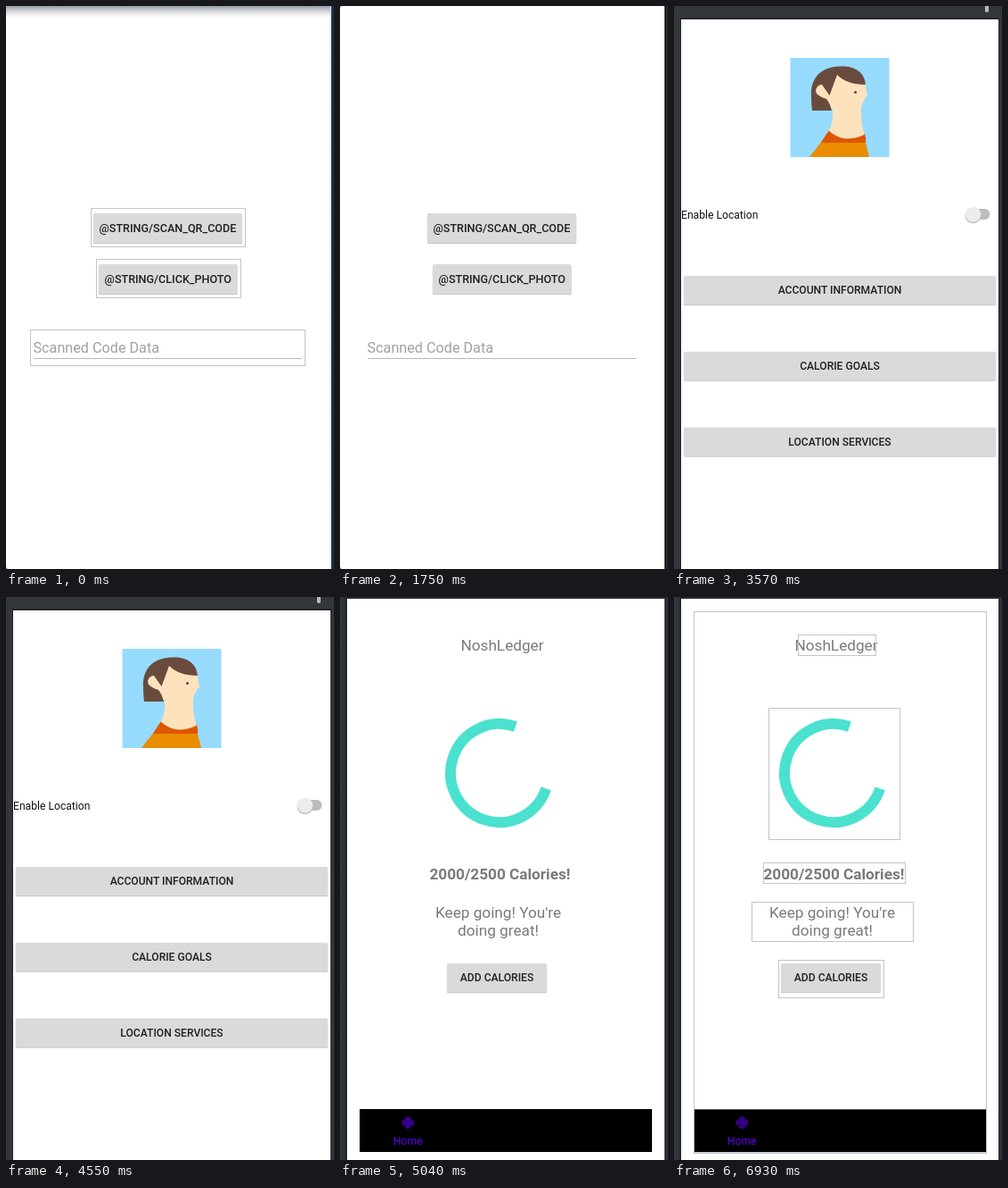
Recreate the animation shown at these times as an HTML page. Size 368 by 630 pixels, loop 7420 ms.

```html
<!DOCTYPE html>
<html lang="en">
<head>
<meta charset="utf-8">
<title>App layout preview</title>
<style>
  html, body { margin: 0; width: 100%; height: 100%; overflow: hidden; background: #fff; }
  svg { display: block; width: 368px; height: 630px; font-family: Roboto, sans-serif; }
  .btn { font-weight: 500; fill: #202020; text-anchor: middle; }
  .mid { font-size: 17.2px; fill: #7a7a7a; text-anchor: middle; }
  .box { fill: none; stroke: #c4c4c4; }
  .pick { fill: none; stroke: #8eb0d3; }
  .dots { stroke-dasharray: 1 1; }
</style>
</head>
<body>
<svg id="stage" viewBox="0 0 368 630">
  <defs>
    <linearGradient id="topShade" x1="0" y1="0" x2="0" y2="1">
      <stop offset="0" stop-color="#8b9bb2"/>
      <stop offset=".22" stop-color="#b9bbc1"/>
      <stop offset=".6" stop-color="#e6e4e4"/>
      <stop offset="1" stop-color="#fff"/>
    </linearGradient>
    <linearGradient id="side">
      <stop offset="0" stop-color="#34393e"/>
      <stop offset=".6" stop-color="#2f3337"/>
      <stop offset="1" stop-color="#202326"/>
    </linearGradient>
  </defs>

  <g id="scan">
    <rect width="368" height="630" fill="#fff"/>
    <rect x="364" width="4" height="630" fill="#24272a"/>
    <path d="M0 0h2L0 2zM0 630h2L0 628z" fill="#8a8a8a"/>
    <g id="scanButtons"></g>
    <text x="30.5" y="388" font-size="16.2" fill="#a1a1a1">Scanned Code Data</text>
    <path d="M31 394.5H332" stroke="#b9b9b9"/>
    <g id="scanBoxes">
      <rect width="365" height="13" fill="url(#topShade)"/>
      <path d="M364.5 0V630" stroke="#fff"/>
      <path d="M364.5 0V630" class="pick dots"/>
      <rect x="365" width="3" height="630" fill="#222c38"/>
    </g>
  </g>

  <g id="settings">
    <rect width="368" height="630" fill="#33373b"/>
    <rect x="7" y="13" width="358" height="617" fill="#24272a"/>
    <rect x="8" y="15" width="356" height="615" fill="#fff"/>
    <path d="M349 0h4v6q-2 2-4 0z" fill="#b9bbbd"/>
    <g id="avatar">
      <rect x="130.5" y="58" width="111" height="111" fill="#97dbfe"/>
      <path d="M174 139L214 143Q216 148 215 154H164Z" fill="#dd5600"/>
      <path d="M164.500 153H215L219 169H152Z" fill="#ea8c00"/>
      <path d="M160 85L183 76L215 85L215.500 94L217.500 101L214.500 102Q215 105 212.500 107Q210 110 209.800 118Q210 132 213.500 144Q204 148.500 193 148.500Q182 147 173.500 139.500Q179 132 178 116L158 102Z" fill="#fde3bd"/>
      <path d="M155 117Q154 110 154 101C153 82 163 68 187 67.500C204 67 214 75 215 88Q194 88 183 77L174.500 100L166 88C160 88 157 95 161 99Q166 103 171 104Q175 109 177 117Z" fill="#694b3e"/>
      <circle cx="203.500" cy="96.500" r="1.600" fill="#694b3e"/>
    </g>
    <text x="8" y="238" font-size="12.15" fill="#111">Enable Location</text>
    <rect x="330" y="227" width="24.500" height="12" rx="6" fill="#bcbcbc"/>
    <circle id="thumbShade" cx="335.500" cy="234.300" r="9" fill="#c6c6c6"/>
    <circle cx="335.500" cy="233" r="8.600" fill="#ececec"/>
    <g id="settingsButtons"></g>
  </g>

  <g id="home">
    <rect width="368" height="630" fill="#2c3034"/>
    <rect width="8" height="630" fill="url(#side)"/>
    <rect x="8" y="2" width="356" height="628" fill="#fff"/>
    <text class="mid" x="182" y="60">NoshLedger</text>
    <path id="ring" fill="none" stroke="#4be1cf" stroke-width="12"/>
    <text class="mid" x="179.500" y="315.500" font-weight="700">2000/2500 Calories!</text>
    <text class="mid" x="177.500" y="359">Keep going! You're</text>
    <text class="mid" x="177.500" y="379">doing great!</text>
    <g id="homeButtons"></g>
    <rect x="22" y="573" width="328" height="48" fill="#000"/>
    <rect x="70.500" y="582.500" width="11.500" height="11.500" rx="3" transform="rotate(45 76.250 588.250)" fill="#3a0094"/>
    <path d="M71 585.500H81.500M71 591H81.500M73.500 583V593.500M79 583V593.500" stroke="#270064" stroke-width=".8"/>
    <text x="76.200" y="612.500" font-size="12" fill="#6200ee" text-anchor="middle">Home</text>
    <g id="homeBoxes"></g>
    <g id="pickBody">
      <path class="pick" d="M350.500 16.500H22.500V573.500"/>
      <path d="M350.500 17V573" stroke="#fff"/>
      <path class="pick dots" d="M350.500 17V573"/>
      <path class="pick dots" d="M22 573.500H350"/>
    </g>
    <path id="pickNav" class="pick dots" d="M22.500 573.500H350.500V621.500H22.500Z"/>
  </g>
</svg>
<script>
const LOOP = 7420;
const $ = id => document.getElementById(id);

function add(parent, tag, attrs, text) {
  const el = document.createElementNS('http://www.w3.org/2000/svg', tag);
  for (const key in attrs) el.setAttribute(key, attrs[key]);
  if (text) el.textContent = text;
  $(parent).append(el);
}

function button(parent, x, y, width, height, label, size) {
  const layers = [[-0.5, 1.5, 1, '#eeeeee'], [0, 1, 0, '#c9c9c9'], [0, 0, 0, '#dadada']];
  for (const [dx, dy, grow, fill] of layers)
    add(parent, 'rect', { x: x + dx, y: y + dy, width: width + grow, height, rx: 1.5, fill });
  add(parent, 'text', { class: 'btn', x: x + width / 2, y: y + height / 2 + size * 0.36, 'font-size': size }, label);
}

function boxes(parent, list) {
  for (const [x, y, width, height] of list)
    add(parent, 'rect', { class: 'box', x: x + 0.5, y: y + 0.5, width, height });
}

function arc(cx, cy, r, from, to) {
  const at = deg => {
    const a = deg * Math.PI / 180;
    return `${cx + r * Math.cos(a)} ${cy + r * Math.sin(a)}`;
  };
  return `M${at(from)}A${r} ${r} 0 ${to - from > 180 ? 1 : 0} 1 ${at(to)}`;
}

button('scanButtons', 98, 232, 167, 33, '@STRING/SCAN_QR_CODE', 12.6);
button('scanButtons', 104, 289, 155.5, 33, '@STRING/CLICK_PHOTO', 12.6);
boxes('scanBoxes', [[95, 226, 173, 43], [101, 283, 162, 43], [27, 362, 308, 40]]);

['ACCOUNT INFORMATION', 'CALORIE GOALS', 'LOCATION SERVICES'].forEach((label, i) =>
  button('settingsButtons', 11, 302 + i * 84.7, 350, 32, label, 12.1));

button('homeButtons', 120, 410, 112, 32, 'ADD CALORIES', 12.1);
boxes('homeBoxes', [
  [22, 16, 328, 606], [139, 42, 87, 23], [106, 124, 147, 147],
  [100, 297, 159, 23], [87, 341, 181, 44], [117, 406, 118, 42]
]);
$('ring').setAttribute('d', arc(179, 197, 55, 18.5, 289));

function draw(t) {
  const show = (id, from, to) => {
    $(id).style.display = t >= from && t < to ? '' : 'none';
  };
  show('scan', 0, 2520);
  show('scanBoxes', 0, 1260);
  show('settings', 2520, 4620);
  show('thumbShade', 3150, 4620);
  show('home', 4620, LOOP);
  show('homeBoxes', 6790, LOOP);
  show('pickBody', 6790, 6860);
  show('pickNav', 6860, LOOP);
}

const start = performance.now();
function tick() {
  draw((performance.now() - start) % LOOP);
  requestAnimationFrame(tick);
}
tick();
</script>
</body>
</html>
```
